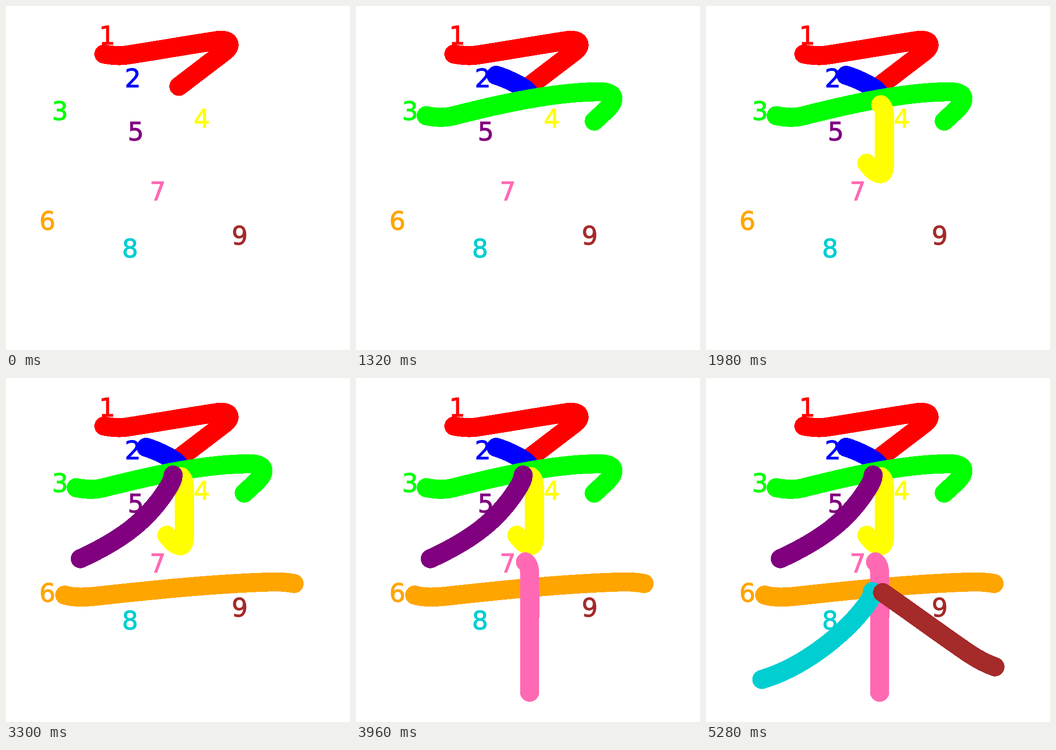
Animation, 748 px wide and 748 px high, one loop 5.94 s. Source, as an HTML page:

```html
<!DOCTYPE html>
<html lang="ja">
<head>
<meta charset="utf-8">
<title>Stroke order</title>
<style>
  html, body { margin: 0; width: 100%; height: 100%; overflow: hidden; background: #fff; }
  svg { display: block; width: 100vw; height: 100vh; }
  path { fill: none; stroke-width: 41.5; stroke-linecap: round; stroke-linejoin: round; shape-rendering: crispEdges; }
  text { font: 55px Verdana, "DejaVu Sans", sans-serif; text-anchor: middle; stroke-width: 1.3; }
</style>
</head>
<body>
<svg viewBox="0 0 748 748"><g id="strokes"></g><g id="labels"></g></svg>
<script>
const STEP = 660;

// Per stroke: colour, label centre, label baseline, centre line
const STROKES = [
  ["#ff0000", 220, 83, "M213 104.5C231 108 247 109 264 106.5C320 98 400 84 462 74.8C487 72 491 86 477 97.5L376 174.7"],
  ["#0000ff", 275.7, 175.5, "M304.7 150.7C326 157 368 176 375.5 188.5"],
  ["#00ff00", 117.5, 247, "M152.7 238.5C172 242.5 194 243.5 213 238.5C270 224 420 185.5 532 186.7C566 187.3 564 207 545 225Q537 233 518 250.3"],
  ["#ffff00", 425.7, 264, "M380 214.7C386 219 388 228 388 238V346C388 370 376 368 363 357Q357 351 349.7 342"],
  ["#800080", 282.2, 292, "M363.5 211C363 222 358 229 353 238C310 307 255 350 161.7 393"],
  ["#ffa500", 90, 485.7, "M127.7 472C144 477 168 477 190 475C310 462 440 448 570 443.7C590 443 610 443.5 626.5 447"],
  ["#ff69b4", 330, 422, "M368.5 400C375 405 377.5 414 377.5 426C378 470 378 500 377.7 530V672L377.5 683.3"],
  ["#00ced1", 269.7, 546, "M361.7 464.5C361.5 474 357 482 351 490C312 546 220 626 121.5 655.5"],
  ["#a52a2a", 508.2, 518, "M384 466.5C440 505 520 564 572 599C590 611 608 621 628.3 628"]
];

function add(parentId, tag, attrs) {
  const el = document.createElementNS("http://www.w3.org/2000/svg", tag);
  for (const name in attrs) el.setAttribute(name, attrs[name]);
  return document.getElementById(parentId).appendChild(el);
}

const paths = STROKES.map(([color, x, y, d], i) => {
  add("labels", "text", { x, y, fill: color, stroke: color }).textContent = i + 1;
  return add("strokes", "path", { d, stroke: color });
});

function draw() {
  const current = Math.floor(performance.now() / STEP) % paths.length;
  paths.forEach((path, i) => {
    path.style.visibility = i <= current ? "visible" : "hidden";
  });
  requestAnimationFrame(draw);
}
draw();
</script>
</body>
</html>
```
